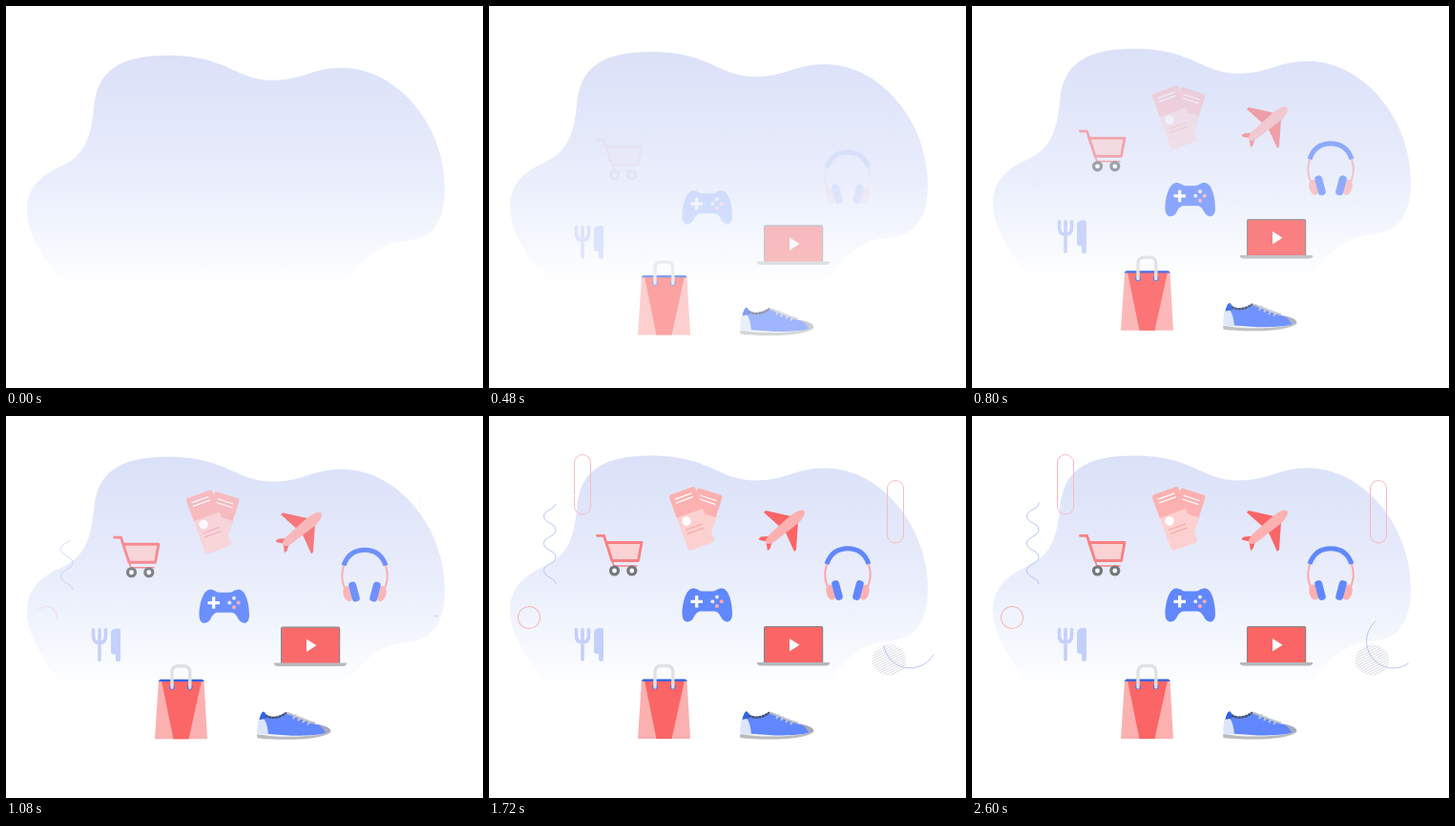
Write an HTML page that moves like this. It is 500 px wide and 400 px high and loops after 5000 ms.

```html
<!DOCTYPE html>
<html lang="en">
<head>
<meta charset="utf-8">
<title>Shopping scene</title>
<style>
  html, body { margin: 0; width: 100%; height: 100%; overflow: hidden; background: #fff; }
  svg { display: block; width: 100vw; height: 100vh; }
  .line { fill: none; stroke-width: 1; }
  .blue { fill: #6187ff; }
  .red { fill: #fb6566; }
  .pink { fill: #fcb0b0; }
  .pale { fill: #fdd0d0; }
</style>
</head>
<body>
<svg viewBox="0 0 500 400">
  <defs>
    <linearGradient id="sky" x1="0" y1="41" x2="0" y2="286" gradientUnits="userSpaceOnUse">
      <stop offset="0" stop-color="#dae1f8"/>
      <stop offset=".45" stop-color="#e7ebfb"/>
      <stop offset=".7" stop-color="#f0f4fd"/>
      <stop offset="1" stop-color="#fff"/>
    </linearGradient>
    <pattern id="hatch" width="2.4" height="2.4" patternUnits="userSpaceOnUse" patternTransform="rotate(-28)">
      <rect width="2.4" height=".8" fill="#d4d6dd"/>
    </pattern>
  </defs>

  <path id="blob" fill="url(#sky)" d="M64 287C40 255 22 230 22 203C22 180 37 167 57 158C82 147 89 128 92 97C95 58 118 41.5 170 41.5C232 41.5 240 67.5 280 67.5C310 67.5 322 54.5 352 54.5C410 54.5 460 115 460 180C460 215 447 232 425 235C397 238 380 244 350 287Z"/>

  <ellipse id="dots" cx="419.5" cy="255.5" rx="18" ry="16" fill="url(#hatch)"/>
  <path id="orbit" class="line" stroke="#b9c6f3"/>
  <path id="wave" class="line" stroke="#b4c4f3" pathLength="1" d="M70 176c0-7-12.500-7-12.500-14.200s12.500-7 12.500-14.200s-12.500-7-12.500-14.200s12.500-7 12.500-14.200s-12.500-7-12.500-14.200s12.500-7 12.500-14.200"/>
  <path id="pillL" class="line" stroke="#f8bcbf" pathLength="1" d="M89.500 83V49a8.500 8.500 0 0 1 17 0V94.500a8.500 8.500 0 0 1-17 0Z"/>
  <path id="pillR" class="line" stroke="#f8bcbf" pathLength="1" d="M417.500 112V76a8.500 8.500 0 0 1 17 0V124.500a8.500 8.500 0 0 1-17 0Z"/>
  <circle id="ring" class="line" stroke="#f8b4b8" pathLength="1" cx="42" cy="211" r="11.500" transform="rotate(-130 42 211)"/>

  <g id="tickets">
    <g transform="translate(219 75) rotate(18)">
      <rect class="pink" width="27.500" height="40" rx="3"/>
      <rect class="pale" y="24" width="27.500" height="16"/>
      <path d="M5 7H23M5 11H23" stroke="#fff" stroke-width="1.200"/>
    </g>
    <g transform="translate(212.500 107.500) rotate(-20)">
      <rect class="pale" x="-14.500" y="-31" width="29" height="62" rx="3"/>
      <path class="pink" d="M-14.500-6V-28a3 3 0 0 1 3-3h23a3 3 0 0 1 3 3V-6Z"/>
      <path d="M-10-25H9M-10-21H9" stroke="#fff" stroke-width="1.300"/>
      <circle cx="-6" cy=".5" r="4.800" fill="#fff"/>
      <path d="M-10 9H9M-10 13.500H9" stroke="#fba9a9" stroke-width="1.200"/>
    </g>
  </g>

  <g id="cart" stroke-linecap="round" stroke-linejoin="round">
    <path d="M123.500 132.500H160L156.500 151.500H129Z" fill="#fbd3d5"/>
    <path d="M113.500 125.300H120.500L129 151.500H156.500L160 132.500H123.500" fill="none" stroke="#f98083" stroke-width="2.800"/>
    <path d="M129 151.500L131 157H155" fill="none" stroke="#f98083" stroke-width="1.600"/>
    <g fill="#fff" stroke="#74787c" stroke-width="3.200">
      <circle cx="131.500" cy="162" r="4"/><circle cx="149.800" cy="162" r="4"/>
    </g>
  </g>

  <g id="plane">
    <path class="red" d="M288 101L290 99L317 105L305 116ZM324 111L322 140L320 142L310 120ZM282.500 128.500L285 126.500L297 125.500L292 131.500L284 130ZM298 128L294.500 139L292 141L290.500 132Z"/>
    <path class="pink" d="M330 99C333 102 328 109 322 114L300 131C296 134 291 135 290 132.500C289 130 292 126 295 123L314 106C320 101 327 97 330 99Z"/>
  </g>

  <g id="phones">
    <path d="M354 155C351 165 351.500 174 357 182M398 155C401 165 400.500 174 395 182" fill="none" stroke="#fba9a9" stroke-width="2"/>
    <path d="M354 155C358 143 366 138.700 376 138.700S394 143 398 155" fill="none" stroke="#6187ff" stroke-width="5"/>
    <g class="pink">
      <ellipse cx="358.500" cy="184.500" rx="5" ry="8.200" transform="rotate(-15 358.500 184.500)"/>
      <ellipse cx="393.500" cy="184.500" rx="5" ry="8.200" transform="rotate(15 393.500 184.500)"/>
    </g>
    <g class="blue">
      <rect x="361" y="172" width="8" height="21" rx="3.500" transform="rotate(-15 365 182.500)"/>
      <rect x="383" y="172" width="8" height="21" rx="3.500" transform="rotate(15 387 182.500)"/>
    </g>
  </g>

  <g id="pad">
    <path class="blue" d="M213 180.500C218 180 220 183 223 183.500H235C238 183 240 180 245 180.500C252 182 255 197 255 207C255 218 247 217 244 212C241 206 239 204.500 235 204.500H223C219 204.500 217 206 214 212C211 217 202.500 218 202.500 207C202.500 197 206 182 213 180.500Z"/>
    <path d="M211.500 194.300H224M217.700 188V200.500" stroke="#fff" stroke-width="3.200"/>
    <g fill="#e6ebff"><circle cx="239" cy="189.500" r="2"/><circle cx="234.300" cy="194.200" r="2"/></g>
    <g fill="#fba9b4"><circle cx="243.700" cy="194.200" r="2"/><circle cx="239" cy="199" r="2"/></g>
  </g>

  <g id="cutlery" fill="#c4d0fc">
    <path d="M91.500 223.500V230C91.500 235 94 237 98 237S104.500 235 104.500 230V223.500M98 223.500V255" fill="none" stroke="#c4d0fc" stroke-width="3.600" stroke-linecap="round"/>
    <path d="M110 227C110 223 113 222 118 222Q120 222 120 224V255Q120 257 117.500 257T115 255V249H112.500Q110 249 110 246Z"/>
  </g>

  <g id="laptop">
    <rect class="red" x="288.600" y="220.600" width="61" height="38.400" rx="1.500" stroke="#85888c" stroke-width="1.300"/>
    <path d="M315 233L325.500 239.700L315 246.500Z" fill="#fff"/>
    <path d="M281 258H357V259.500Q356 261.500 353 261.500H285Q282 261.500 281 259.500Z" fill="#b5b7ba"/>
  </g>

  <g id="bag">
    <path class="pink" d="M160 277H207.500L211 338H156Z"/>
    <path class="red" d="M163 277H205L191.500 338H175.500Z"/>
    <path d="M161.500 275.500H206L208 277.800H159.500Z" fill="#2f62e8"/>
    <g fill="#3f6ff2"><circle cx="174" cy="283.500" r="2.800"/><circle cx="192.800" cy="283.500" r="2.800"/></g>
    <path d="M174 284V268C174 263.500 177 261.500 181 261.500H186C190 261.500 192.800 263.500 192.800 268V284" fill="none" stroke="#dfe1e4" stroke-width="3.400" stroke-linecap="round"/>
  </g>

  <g id="shoe">
    <path d="M263 333L300 334C325 335 337 331 340.300 328V331C336 334.500 325 337 312 338C295 339 275 338.500 263.500 337Z" fill="#b9bbbe"/>
    <path d="M263.500 333C285 337 325 336.500 340 330L338 326L264 329Z" fill="#f3f5fb"/>
    <path class="blue" d="M265.500 318C267 312 269 307.500 272 311C277 317 286 315.500 294 310C302 313 312 319 323 322C333 324 340 326 340 329.500C335 333 325 334.500 300 334.500L264 332C263.500 327 264 321 265.500 318Z"/>
    <path d="M265.500 318C267 312 269 307.500 271 310L273 316.500Z" fill="#2f62e8"/>
    <path d="M264.500 318L270.500 317C274 322 274.500 329 275 333.500L264 332.500C263.500 327 263.800 322 264.500 318Z" fill="#dde5fb"/>
    <path d="M272 313.500C279 317.500 287 315.500 294 310.500" fill="none" stroke="#45506e" stroke-width="2.400" stroke-dasharray="3 .6"/>
    <path d="M294 310.500C303 313.500 312 318.500 324 321.500" fill="none" stroke="#b9bcc4" stroke-width="2"/>
    <path d="M301 317L304 312M306 319L309 314.500M311 321L314 317M316 323L319 319" stroke="#c9ccd6" stroke-width="1.700"/>
    <path d="M325 322C333 324 340 326 340 329.500L335 331.500C333 327 330 324 325 322Z" fill="#a9abb3"/>
  </g>
</svg>
<script>
const LOOP = 5000, STEP = 40;
const $ = id => document.getElementById(id);

// Cubic ease-out progress from start over span.
const ease = (t, start, span) => {
  const u = Math.min(1, Math.max(0, (t - start) / span));
  return 1 - (1 - u) ** 3;
};

const rise = (el, p, dist) => {
  el.style.opacity = p;
  el.style.transform = `translateY(${(1 - p) * dist}px)`;
};

const starts = {
  bag: 165, shoe: 165, cutlery: 230, laptop: 285, pad: 395,
  phones: 435, cart: 455, plane: 515, tickets: 600
};
const items = Object.entries(starts).map(([id, start]) => [$(id), start]);

// id, start, span, rise, grows from the middle
const strokes = [
  ['wave', 750, 1200, 16, false],
  ['pillR', 1040, 800, 10, true],
  ['pillL', 1080, 800, 10, true],
  ['ring', 960, 800, 0, false]
].map(([id, ...rest]) => [$(id), ...rest]);

const blob = $('blob'), orbit = $('orbit'), dots = $('dots');

const onOrbit = deg => {
  const a = deg * Math.PI / 180;
  return `${441.5 + 28 * Math.cos(a)} ${236 + 28 * Math.sin(a)}`;
};

function draw(t) {
  blob.setAttribute('transform', `translate(0 ${10.2 * (1 - ease(t, 240, 1720))})`);

  for (const [el, start] of items) rise(el, ease(t, start, 1200), 16);

  for (const [el, start, span, dist, centred] of strokes) {
    const p = ease(t, start, span);
    el.style.opacity = p;
    if (dist) rise(el, p, dist);
    el.style.strokeDasharray = p < 1 ? `${p} 2` : 'none';
    el.style.strokeDashoffset = centred ? (p - 1) / 2 : 0;
  }

  const p = ease(t, 1060, 1540);
  const from = -80 + 135 * p, to = -80 + 310 * p;
  orbit.setAttribute('d', p
    ? `M${onOrbit(from)}A28 28 0 ${to - from > 180 ? 1 : 0} 1 ${onOrbit(to)}`
    : '');

  dots.style.opacity = ease(t, 1400, 500);
}

const origin = performance.now();
function tick() {
  const t = Math.max(0, performance.now() - origin) % LOOP;
  draw(Math.floor(t / STEP) * STEP);
  requestAnimationFrame(tick);
}
tick();
</script>
</body>
</html>
```
